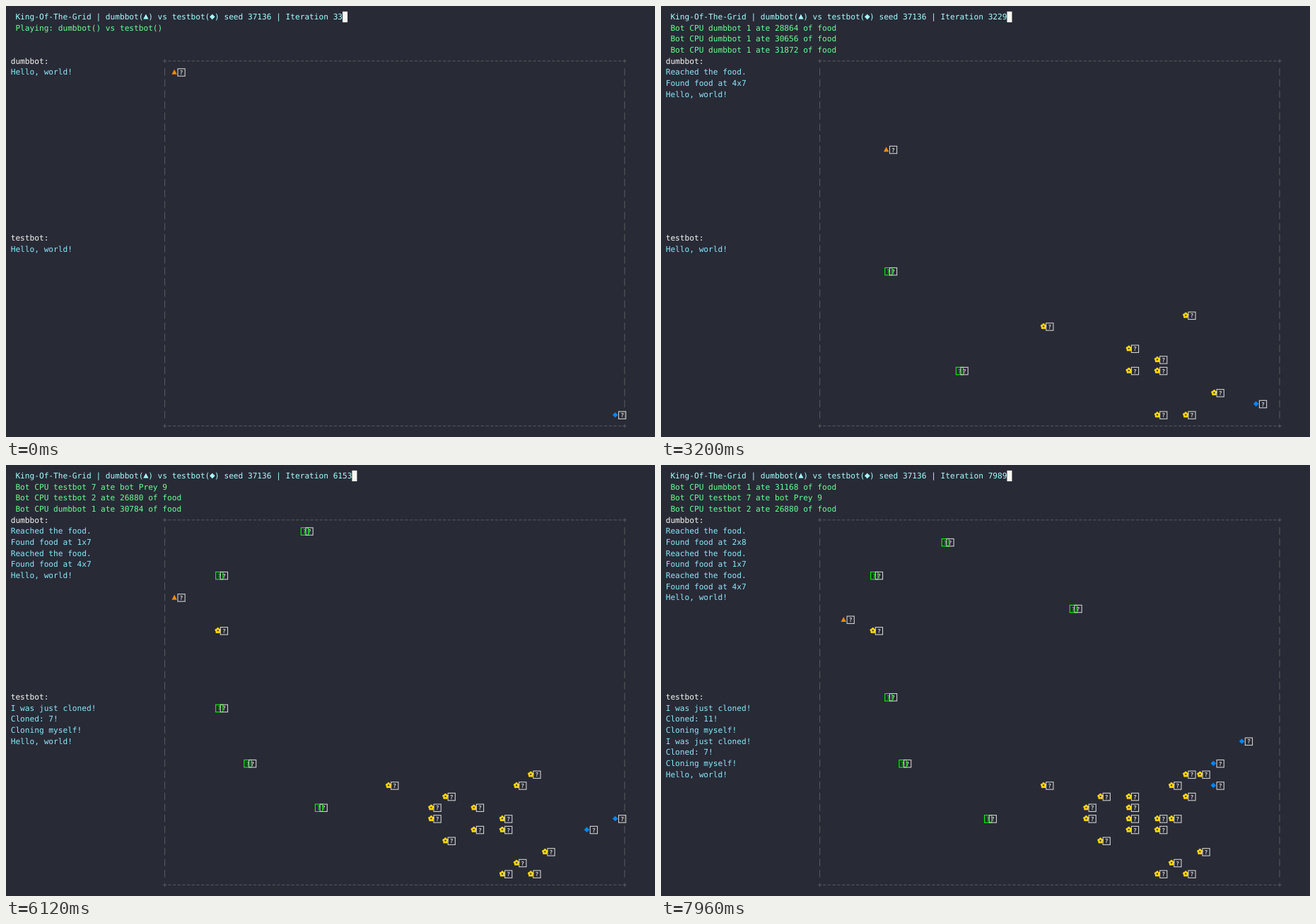
Animation of 918 by 610 pixels, one loop 7990 ms. Source, as an HTML page:

```html
<!DOCTYPE html>
<html lang="en">
<head>
<meta charset="utf-8">
<title>King-Of-The-Grid</title>
<style>
  html, body { margin: 0; width: 100%; height: 100%; overflow: hidden; background: #282a36; }
  svg { display: block; width: 918px; height: 610px; }
  text {
    font: 11.17px "DejaVu Sans Mono", "Noto Sans Mono", monospace;
    text-rendering: geometricPrecision;
    white-space: pre;
    fill: currentColor;
  }
  .mark { font-size: 8.2px; font-weight: bold; text-anchor: middle; }
  .title { color: #a4ffff; }
  .log { color: #69ff94; }
  .name { color: #f8f8f2; }
  .say { color: #8be9fd; }
  .dumbbot { color: #ff8700; }
  .testbot { color: #0087ff; }
  .prey { color: #00ff00; }
  .food { color: #ffd700; }
  .tofu { color: #d2d2ce; }
  .frame { fill: none; stroke: #626262; stroke-width: .9; }
</style>
</head>
<body>
<svg id="stage" viewBox="0 0 918 610">
  <defs>
    <g id="tofu">
      <rect x=".4" y="-5.1" width="10.2" height="10.4" fill="none" stroke="currentColor" stroke-width="1.1"/>
      <text class="mark" x="5.5" y="3.1">?</text>
    </g>
    <path id="dumbbot" d="M-.2 2.9 3.45-4.2 7.1 2.9Z" fill="currentColor"/>
    <path id="testbot" d="M-.3-.3 3.5-4.1 7.3-.3 3.5 3.5Z" fill="currentColor"/>
    <g id="prey"><use href="#tofu" x="1.2"/></g>
    <g id="food" fill="currentColor"></g>
  </defs>
  <rect width="918" height="610" fill="#282a36"/>
  <g id="border"></g>
  <g id="sprites"></g>
  <g id="lines"></g>
  <rect id="cursor" fill="#f8f8f2"/>
</svg>
<script>
const LOOP = 7990, STEP = 34;
const CW = 6.705, RH = 15.65;
const NS = 'http://www.w3.org/2000/svg';
const GLYPHS = { '▲': 'dumbbot', '◆': 'testbot' };
const $ = id => document.getElementById(id);
const colX = col => (col + 1) * CW;
const rowY = row => (row + 1) * RH;          // middle of a row

const ate = (bot, amount) => `Bot CPU ${bot} ate ${amount} of food`;
const cloning = n => ['Cloning myself!', `Cloned: ${n}!`, 'I was just cloned!'];
const found = at => `Found food at ${at}`;
const reached = 'Reached the food.';

// The game in acts, each ending at a step. What an act holds is spread evenly
// over it; lines in a nested list come together.
const acts = [
  { end: 28, food: '4,7 27,29 23,27' },
  { end: 67, food: '15,23 21,25 23,31 25,31',
    news: [[ate('dumbbot 1', 31872), ate('dumbbot 1', 30656)]], dumb: [found('4x7')] },
  { end: 122, food: '25,22 23,26 21,27 26,29 24,30 3,3',
    news: [ate('dumbbot 1', 28864), ate('dumbbot 1', 30784)], dumb: [reached, found('1x7')] },
  { end: 159, food: '18,25 18,26 19,28',
    news: [ate('testbot 2', 26880)], dumb: [reached], test: [cloning(7)] },
  { end: 200, food: '3,9 24,23 19,24 25,24 21,26 24,26', news: ['Bot CPU testbot 7 ate bot Prey 9'] },
  { end: 234, food: '26,22 21,24',
    news: [ate('dumbbot 1', 31168)], dumb: [[found('2x8'), reached]], test: [cloning(11)] }
];
acts.forEach((act, i) => {
  act.start = i ? acts[i - 1].end : 0;
  act.at = part => act.start + (act.end - act.start) * part;
});
const lastStep = acts[acts.length - 1].end;

const points = list => list.split(' ').filter(Boolean).map(p => p.split(',').map(Number));

// Stops in each act; a walker that joins later appears halfway through its first act.
function walker(kind, route) {
  const path = [];
  route.split('|').forEach((stops, i) => {
    const list = points(stops);
    list.forEach(([x, y], j) => {
      if (!path.length) path.push([i ? acts[i].at(.5) : 0, x, y]);
      path.push([acts[i].at((j + 1) / list.length), x, y]);
    });
  });
  return { kind, path, born: path[0][0] };
}

const walkers = [
  walker('dumbbot', '0,0 | 3,10 | 4,7 1,7 | 0,4 | 0,7 | 2,8 1,8'),
  walker('testbot', '31,31 | 31,29 | 30,30 31,31 | 27,29 29,28 | 29,26 | 27,23'),
  walker('testbot', '||| 30,29 | 31,24 | 29,19'),
  walker('testbot', '||||| 27,21'),
  walker('prey', '| 4,17 | 4,20 | 5,21'),
  walker('prey', '| 9,27 | 9,26 | 8,26 | 11,25 | 11,27 11,26'),
  walker('prey', '|| 9,3 | 8,1 | 9,0 | 8,1'),
  walker('prey', '|| 3,4 | 3,3 | 3,4'),
  walker('prey', '||| 2,17 | 4,16 | 4,15'),
  walker('prey', '||||| 17,7')
];

function position({ path }, step) {
  const next = path.findIndex(p => p[0] > step);
  if (next < 0) return path[path.length - 1].slice(1);
  const [t0, x0, y0] = path[next - 1], [t1, x1, y1] = path[next];
  const part = (step - t0) / (t1 - t0);
  return [Math.round(x0 + (x1 - x0) * part), Math.round(y0 + (y1 - y0) * part)];
}

// Food lasts until a walker steps on it.
function plant(x, y, born) {
  const visited = step => walkers.some(w => {
    if (step < w.born) return false;
    const [wx, wy] = position(w, step);
    return wx === x && wy === y;
  });
  let eaten = Math.ceil(born);
  while (eaten <= lastStep && !visited(eaten)) eaten++;
  return { x, y, born, eaten };
}

const spread = (act, list) => list.map((item, i) => [act.at((i + 1) / (list.length + 1)), item]);
const foods = acts.flatMap(act =>
  spread(act, points(act.food)).map(([born, [x, y]]) => plant(x, y, born)));

function makeLog(first, key) {
  const later = acts.flatMap(act => spread(act, act[key] || []));
  return [[0, first], ...later].flatMap(([at, lines]) => [lines].flat().map(text => ({ at, text })));
}
const news = makeLog('Playing: dumbbot() vs testbot()', 'news');
const dumbLog = makeLog('Hello, world!', 'dumb');
const testLog = makeLog('Hello, world!', 'test');

function add(parent, tag, attrs) {
  const el = document.createElementNS(NS, tag);
  for (const key in attrs) el.setAttribute(key, attrs[key]);
  return parent.appendChild(el);
}

// Text is set on the terminal's cell grid; bot symbols are drawn as shapes.
function print(col, row, cls, text) {
  const chars = Array.from(text);
  const x = chars.map((_, i) => colX(col + i).toFixed(2)).join(' ');
  add($('lines'), 'text', { x, y: rowY(row) + 3.4, class: cls }).textContent =
    chars.map(c => GLYPHS[c] ? ' ' : c).join('');
  chars.forEach((c, i) => {
    if (GLYPHS[c])
      add($('lines'), 'use', { href: '#' + GLYPHS[c], x: colX(col + i), y: rowY(row), class: cls });
  });
}

function printLog(log, step, col, row, cls, max) {
  log.filter(line => line.at <= step).reverse().slice(0, max)
    .forEach((line, i) => print(col, row + i, cls, line.text));
}

function sprite(kind, x, y) {
  const left = colX(34 + 3 * x), middle = rowY(5 + y);
  add($('sprites'), 'use', { href: '#' + kind, class: kind, x: left, y: middle });
  add($('sprites'), 'use', { href: '#tofu', class: 'tofu', x: left + 7.9, y: middle });
}

function draw(step) {
  $('sprites').replaceChildren();
  $('lines').replaceChildren();

  for (const f of foods)
    if (step >= f.born && step < f.eaten) sprite('food', f.x, f.y);
  for (const w of walkers)
    if (step >= w.born) sprite(w.kind, ...position(w, step));

  const title = `King-Of-The-Grid | dumbbot(▲) vs testbot(◆) seed 37136 | Iteration ${33 + step * STEP}`;
  print(1, 0, 'title', title);
  $('cursor').setAttribute('x', colX(1 + title.length));
  printLog(news, step, 1, 1, 'log', 3);
  print(0, 4, 'name', 'dumbbot:');
  printLog(dumbLog, step, 0, 5, 'say');
  print(0, 20, 'name', 'testbot:');
  printLog(testLog, step, 0, 21, 'say');
}

function setup() {
  const cursor = $('cursor');
  cursor.setAttribute('y', RH / 2);
  cursor.setAttribute('width', 7);
  cursor.setAttribute('height', RH - .4);

  const flower = { cx: 4.7, cy: -.4 };
  for (let i = 0; i < 5; i++) {
    const a = (i * 72 - 90) * Math.PI / 180;
    add($('food'), 'circle',
      { cx: flower.cx + 2.5 * Math.cos(a), cy: flower.cy + 2.5 * Math.sin(a), r: 1.85 });
  }
  add($('food'), 'circle', { ...flower, r: 2.2 });
  add($('food'), 'circle', { ...flower, r: 1.1, fill: '#282a36' });

  const line = (d, dash) =>
    add($('border'), 'path', { class: 'frame', d, 'stroke-dasharray': dash || 'none' });
  const sides = [colX(32.5), colX(129.5)], hyphen = 4.3, bar = 10.4;
  for (const row of [4, 37]) {
    const y = rowY(row) - .4;
    line(`M${colX(33) + 1.2} ${y}H${colX(129)}`, `${hyphen} ${CW - hyphen}`);
    for (const x of sides) line(`M${x - 2.7} ${y}h5.4M${x} ${y - 2.7}v5.4`);
  }
  for (const x of sides)
    line(`M${x} ${rowY(5) - 5.8}V${rowY(36.45)}`, `${bar} ${RH - bar}`);
}

let shown = -1;
const start = performance.now();
function tick() {
  const t = (performance.now() - start) % LOOP;
  // Steps start on whole hundredths of a second.
  const step = Math.floor((Math.floor(t / 10) * 10 + 5) / STEP);
  if (step !== shown) draw(shown = step);
  requestAnimationFrame(tick);
}
setup();
tick();
</script>
</body>
</html>
```
